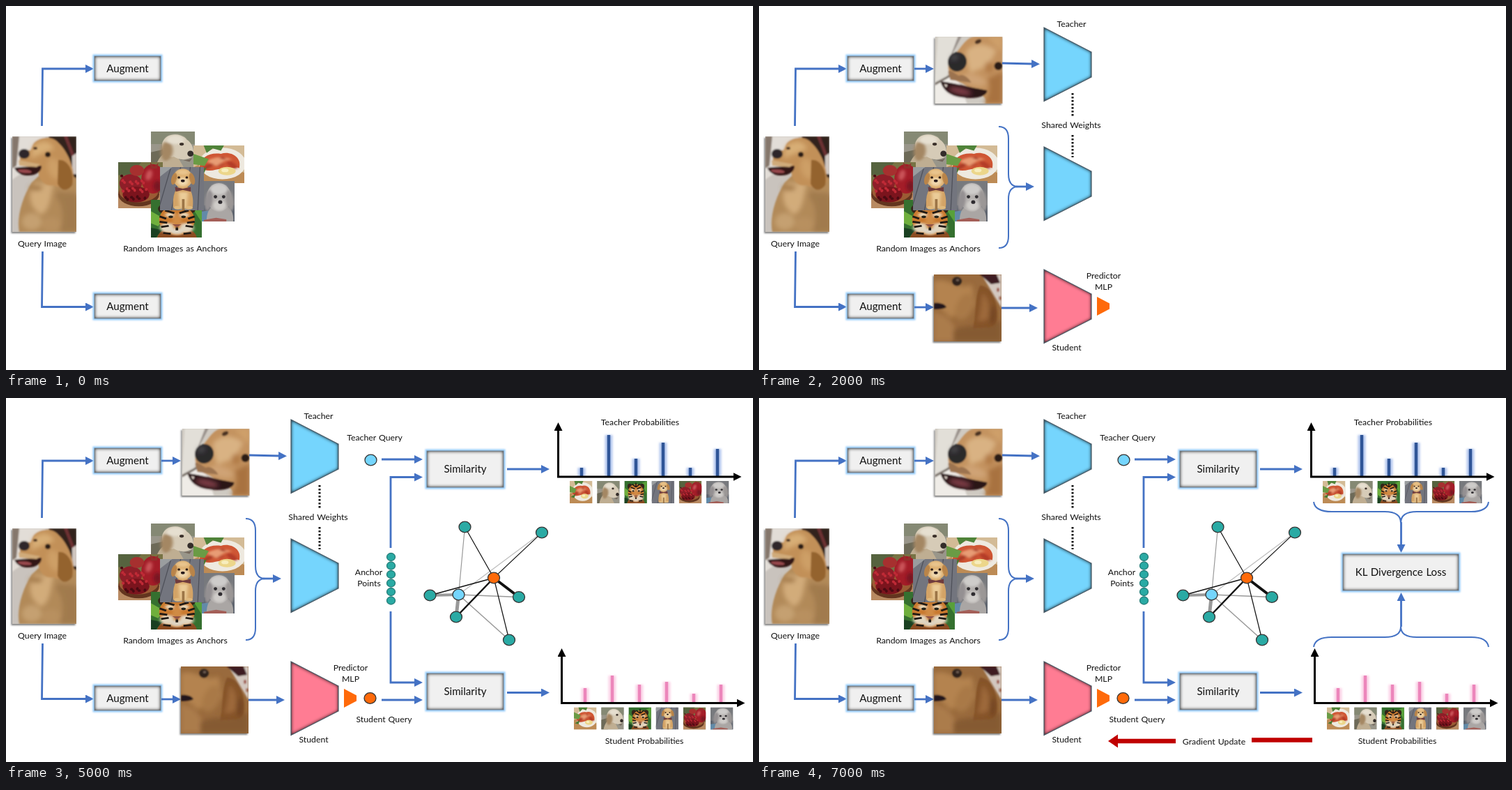
These frames come from a looping animation (1072x522 px, 8000 ms). An HTML page:

```html
<!DOCTYPE html>
<html lang="en">
<head>
<meta charset="utf-8">
<title>Teacher and student similarity</title>
<style>
  html, body { margin: 0; width: 100%; height: 100%; overflow: hidden; background: #fff; }
  svg { display: block; }
  text { font-family: Lato, Carlito, sans-serif; font-size: 12.3px; text-anchor: middle; fill: #111; word-spacing: .8px; }
  text.big { font-size: 15.1px; }
  .arrow { fill: none; stroke: #4472c4; stroke-width: 2.8; marker-end: url(#blueHead); }
  .brace { fill: none; stroke: #4472c4; stroke-width: 2; }
  .axis { fill: none; stroke: #000; stroke-width: 3; marker-end: url(#blackHead); }
</style>
</head>
<body>
<svg id="stage" width="1072" height="522" viewBox="0 0 1072 522"></svg>
<script>
const BLUE = '#75d5fd', ORANGE = '#ff6a0a', TEAL = '#2aaaa4', PINK = '#ff7c93';

const path = (d, fill) => `<path d="${d}" fill="${fill}"/>`;
const blob = (x, y, rx, ry, fill, turn = 0) =>
  `<ellipse cx="${x}" cy="${y}" rx="${rx}" ry="${ry}" fill="${fill}" transform="rotate(${turn} ${x} ${y})"/>`;
const text = (x, y, s, cls = '') => `<text class="${cls}" x="${x}" y="${y + (cls ? 5.4 : 4.4)}">${s}</text>`;
const line = (cls, d) => `<path class="${cls}" d="${d}"/>`;
const arrow = d => line('arrow', d);
const stroke = (d, color, width, extra = '') =>
  `<path d="${d}" fill="none" stroke="${color}" stroke-width="${width}" ${extra}/>`;
const haze = shapes => `<g filter="url(#haze)">${shapes}</g>`;
const dot = (x, y, fill, rx = 8.5, ry = 7.8, edge = '#333') =>
  `<ellipse cx="${x}" cy="${y}" rx="${rx}" ry="${ry}" fill="${fill}" stroke="${edge}" stroke-width="1.3"/>`;
const photo = (name, x, y, w, h) =>
  `<use href="#${name}" x="${x}" y="${y}" width="${w}" height="${h}"/>`;
const framed = (name, x, y, w, h) => `<g filter="url(#drop)">${photo(name, x, y, w, h)}</g>`;

function box(x, y, w, h, label) {
  const size = `x="${x}" y="${y}" width="${w}" height="${h}"`;
  return `<rect ${size} fill="none" stroke="#93cbfb" stroke-width="5" filter="url(#soft)"/>
    <rect ${size} fill="#f0f0f0" filter="url(#inner)"/>
    <rect ${size} fill="none" stroke="#76818c" stroke-width="1"/>` +
    text(x + w / 2, y + h / 2, label, 'big');
}

function encoder(y, fill) {
  const d = `M409 ${y}l68 35v36l-68 34.5z`;
  return `<path d="${d}" fill="${fill}" filter="url(#inner)"/>` + stroke(d, '#4a5a66', 1.2);
}

function chart(x, base, top, color, glow, tops, thumbX, thumbY) {
  const order = ['lobster', 'retriever', 'tiger', 'puppy', 'fruit', 'whiteDog'];
  const bars = tops.map((t, i) => {
    const d = `M${x + 33.5 + i * 39} ${base - 1}V${t}`;
    return stroke(d, glow, 11, 'filter="url(#glow)"') + stroke(d, color, 4.5);
  });
  return bars.join('') +
    line('axis', `M${x} ${base}V${top + 10}`) + line('axis', `M${x - 1.5} ${base}H${x + 252}`) +
    order.map((name, i) => photo(name, thumbX + i * 39.2, thumbY, 32.5, 32)).join('');
}

// Simplified pictures: width, height, ground colour, shapes.
const pictures = {
  query: [92, 137, '#c9c3bd',
    path('M0 0H48L20 48L0 62z', '#e2ddd7') + path('M0 0H10L6 42L0 46z', '#85776c') +
    path('M52 0H92V64L72 38z', '#33201f') + path('M74 0h5l10 26v12z', '#6d3033') +
    path('M86 28l6-4v30h-6z', '#cfc6c0') +
    path('M28 66C14 88 6 116 10 137H92V60L56 40z', '#b28a59') +
    haze(path('M32 66C20 84 26 104 42 112C56 104 54 84 60 68z', '#d2ac7a') +
      path('M66 78C80 86 96 70 96 100V137H68C76 116 72 96 62 86z', '#a17a4d') +
      blob(28, 122, 14, 12, '#c5a071') + blob(56, 126, 14, 10, '#b8905f') + blob(34, 74, 10, 4, '#a3794a')) +
    path('M30 11C38 0 58-1 66 9C80 22 90 46 88 66C78 74 66 74 58 70C46 72 36 60 38 50L12 37C8 26 14 18 26 20z', '#c29058') +
    haze(path('M30 14C42 4 56 6 60 18L44 24L26 32z', '#d8ae76') + blob(60, 46, 9, 15, '#cd9f66', -15)) +
    path('M66 34C80 32 90 52 86 70C78 80 70 78 65 68z', '#94632f') +
    path('M3 45C15 43 26 44 42 42C43 50 34 57 20 56C10 55 5 50 3 45z', '#331817') +
    blob(18, 50, 10, 2.4, '#9a4a4e', 6) + path('M9 34L40 40L35 44L10 42z', '#d0ab7a') +
    blob(17, 25, 8, 7, '#2e282a') + blob(51, 26, 4, 3.8, '#2b1b15') + blob(33, 17, 3, 2, '#4a3020')],
  cropFace: [97, 96, '#cfcac2',
    path('M4 0H34L16 60L0 66z', '#e2dfd8') + path('M33 0h5L20 34z', '#98908a') +
    path('M0 66L30 54L46 96H0z', '#efece7') + path('M0 66L22 54L23 57L0 70z', '#7b736c') +
    path('M30 24C40 12 46 0 58 0H97V96H72C78 86 60 80 38 66C18 62 16 42 22 32z', '#c3925f') +
    haze(path('M44 22C56 6 76 10 88 20L76 42L50 52z', '#d9b283') + path('M76 60L97 50V96H70C78 84 80 74 76 60z', '#a8723f') +
      path('M74 0H97V22z', '#cfa06a') + blob(56, 62, 18, 8, '#cfa374', 15) + blob(78, 44, 7, 8, '#b27d49')) +
    path('M8 64C28 66 46 72 75 77C75 86 58 90 38 87C22 85 11 77 8 64z', '#2a1517') +
    haze(blob(36, 78, 17, 4.5, '#84404a', 12)) + path('M13 68l3 5l2-4z', '#e8ddd2') +
    path('M19 50C21 46 28 52 34 56C40 52 50 60 52 66L22 62z', '#9c7350') +
    blob(32, 36, 13.5, 14, '#2b292c', 20) + haze(blob(28, 30, 5, 3, '#59565b', -25)) +
    blob(62, 7, 5, 3, '#4b3322', -25) + blob(91, 42, 6, 6, '#2b1b15')],
  cropEar: [97, 96, '#996a3c',
    path('M68 0H97V48L84 26z', '#d3c8c0') + path('M66 0H90L95 12L82 14z', '#3d1e20') +
    blob(92, 22, 2, 3, '#9f5b50') + blob(95, 34, 2, 3, '#a5705d') +
    haze(path('M0 10C18 2 36 24 54 14L60 44L24 62L0 40z', '#b4834f') + path('M0 54C20 58 34 72 32 96H0z', '#ab7b4b') +
      path('M28 80C46 70 60 78 97 66V96H28z', '#855a33') + blob(44, 46, 12, 20, '#a97946', 25)) +
    path('M66 16C84 16 94 44 90 68C84 80 66 74 56 78C61 56 58 34 66 16z', '#855329') +
    haze(path('M70 26C80 36 82 50 78 64C70 68 66 66 62 68C67 54 67 40 70 26z', '#9d693a') + blob(84, 58, 4, 14, '#714420')) +
    path('M0 41C8 40 16 42 18 47C12 51 5 49 0 50z', '#20151a') +
    blob(33, 10, 7, 6.5, '#2e211e') + blob(34, 8, 2, 1.5, '#7c695c')],
  retriever: [100, 100, '#99968a',
    path('M0 0H100V34H0z', '#858974') + path('M0 56L30 48V100H0z', '#6d6a58') +
    path('M10 100C16 66 34 48 56 58L76 100z', '#bfae92') +
    path('M26 30C34 2 68 2 82 22C96 32 100 56 94 68C80 80 62 76 52 68C40 74 22 56 26 30z', '#d6cbb7') +
    haze(blob(56, 22, 20, 12, '#e6dfd0') + path('M32 28C20 38 18 70 32 80C50 76 54 50 46 34z', '#a48764')) +
    blob(90, 60, 7, 8, '#342d2a') + blob(70, 34, 5, 4, '#3b302a') + path('M62 74Q78 82 94 72L88 82z', '#75685d')],
  lobster: [100, 100, '#d3bb96',
    path('M0 58L28 40L100 72V100H0z', '#bd8b55') + blob(57, 48, 46, 42, '#eee9df') +
    path('M12 58C14 30 32 18 54 22C74 14 96 32 90 60C80 54 72 68 58 62C44 60 32 76 12 58z', '#cf5634') +
    haze(path('M26 42Q46 24 76 36Q56 40 46 56z', '#e89c74') + blob(76, 52, 13, 6, '#b23a27', 45) +
      blob(28, 56, 13, 5, '#a93b27', -35) + blob(58, 34, 6, 3, '#a83a28', 25) + blob(54, 52, 8, 3, '#b8472f', -20)) +
    blob(66, 68, 17, 11, '#ecd68a') + blob(62, 66, 7, 5, '#f7edbd') +
    path('M20 0H60L54 14L38 8L26 20z', '#4f8339') + path('M0 22L30 36L22 54L0 50z', '#6a9b45') +
    path('M4 72L26 58L20 76z', '#477a30')],
  fruit: [100, 100, '#777344',
    path('M0 0H52L28 28H0z', '#56633f') + path('M0 66H100V100H0z', '#b88a62') +
    blob(46, 70, 46, 26, '#63351f') + blob(46, 63, 44, 24, '#9b5b34') +
    blob(78, 36, 26, 32, '#a31d28') + haze(blob(69, 28, 7, 12, '#cb555a', 20) + blob(88, 52, 9, 12, '#791620')) +
    path('M72 0L80 10L90 2L87 14H73z', '#93302c') +
    blob(28, 46, 25, 20, '#8e1e28') + blob(40, 70, 30, 17, '#7b141d') + blob(42, 18, 16, 12, '#a6302f') +
    [...Array(24)].map((_, i) => blob(8 + i * 23 % 56, 30 + i * 17 % 52, 3.5, 3, i % 3 ? '#bf2a36' : '#4a0b12', i * 40)).join('')],
  puppy: [100, 100, '#73757e',
    [0, 1, 2, 3, 4].map(i => stroke(`M${i * 30 - 34} 100L${i * 22 + 3} 0`, '#4e5059', 2)).join('') +
    path('M0 0H28L0 22z', '#9a9d9f') + path('M30 94C28 64 36 42 52 42C72 42 78 72 74 96z', '#d3a366') +
    haze(path('M42 58H64L60 98H46z', '#ebcc98')) + path('M50 74h6v26h-6z', '#9c7547') +
    blob(52, 26, 22, 22, '#dcae6f') + blob(32, 27, 6, 14, '#b98449', 14) + blob(73, 27, 6, 14, '#b98449', -14) +
    haze(blob(52, 34, 13, 10, '#efd7ad') + blob(52, 12, 14, 6, '#e9c58d')) +
    blob(43, 24, 3, 2.6, '#2b1c16') + blob(61, 24, 3, 2.6, '#2b1c16') + blob(52, 32, 4.5, 3.2, '#26191a') +
    path('M34 46L52 50L70 46V57L52 53L36 57z', '#6f3b3d') + blob(40, 94, 8, 4, '#dfb97d') + blob(66, 94, 8, 4, '#dfb97d')],
  whiteDog: [100, 100, '#77797d',
    path('M0 60H100V100H0z', '#5f656f') + path('M0 76L32 72V100H0z', '#628aa8') +
    path('M18 100C18 68 34 58 58 58C86 58 98 76 96 100z', '#aaa6a4') +
    blob(54, 40, 36, 35, '#b5b1af') +
    haze(blob(24, 48, 11, 26, '#949092', 10) + blob(86, 48, 11, 26, '#9b9796', -10) +
      blob(54, 20, 24, 13, '#ceccca') + blob(56, 60, 18, 13, '#cfccc9')) +
    blob(44, 39, 5, 4, '#2f2d30') + blob(68, 39, 5, 4, '#2f2d30') + blob(58, 52, 6, 4.5, '#2e2b2f') +
    path('M10 96L46 91L76 95V100H10z', '#a45f58')],
  tiger: [100, 100, '#35702f',
    path('M0 30L26 50L14 70L0 62z', '#6faf3d') + path('M76 10L100 0V60z', '#58a03a') + path('M0 74L22 80L10 100H0z', '#1a4021') +
    path('M12 100C16 82 30 72 50 72C74 72 88 84 90 100z', '#8b4c22') +
    blob(24, 24, 10, 12, '#33241a') + blob(78, 24, 10, 12, '#33241a') + blob(51, 54, 35, 40, '#c9792e') +
    haze(blob(32, 74, 14, 13, '#e2d6c0') + blob(70, 74, 14, 13, '#e2d6c0') + blob(38, 40, 10, 6, '#e8dabf') +
      blob(65, 40, 10, 6, '#e8dabf') + blob(51, 84, 14, 8, '#ded4c3') + path('M44 36H58L61 66H41z', '#d08b45')) +
    path('M42 65H60L51 73z', '#925547') + blob(39, 45, 4.5, 3.5, '#25231a') + blob(64, 45, 4.5, 3.5, '#25231a') +
    stroke('M34 14l15 12M68 14l-15 12M28 28l18 7M74 28l-18 7M51 8v20M17 44l13 6M86 44l-13 6M17 58l15 3M86 58l-15 3M20 72l15-3M83 72l-15-3M24 88l15 2M79 88l-15 2M51 73v8', '#201a15', 5)]
};

const symbols = Object.entries(pictures).map(([name, [w, h, ground, art]]) =>
  `<symbol id="${name}" viewBox="0 0 ${w} ${h}" preserveAspectRatio="none">
    <rect width="${w}" height="${h}" fill="${ground}"/><g filter="url(#photo)">${art}</g></symbol>`).join('');

const head = (id, color) =>
  `<marker id="${id}" markerUnits="userSpaceOnUse" markerWidth="12" markerHeight="12" refX="1" refY="6" orient="auto">
    <path d="M0 0L12 6L0 12z" fill="${color}"/></marker>`;
const blur = (id, amount) =>
  `<filter id="${id}" x="-2" y="-2" width="5" height="5"><feGaussianBlur stdDeviation="${amount}"/></filter>`;

const defs = `<defs>${head('blueHead', '#4472c4')}${head('blackHead', '#000')}
  ${blur('soft', 1)}${blur('photo', .9)}${blur('haze', 3)}
  <filter id="glow" filterUnits="userSpaceOnUse" x="780" y="20" width="292" height="450"><feGaussianBlur stdDeviation="1.5"/></filter>
  <filter id="drop"><feDropShadow dx="-1.5" dy="2" stdDeviation="1.2" flood-color="#555" flood-opacity=".75"/></filter>
  <filter id="inner" color-interpolation-filters="sRGB">
    <feGaussianBlur in="SourceAlpha" stdDeviation="2.6" result="b"/>
    <feComposite in="SourceAlpha" in2="b" operator="out" result="edge"/>
    <feMerge><feMergeNode in="SourceGraphic"/><feMergeNode in="edge"/></feMerge>
  </filter>${symbols}</defs>`;

const teacherNode = [649.5, 282], studentNode = [700, 258];
const anchors = [[658.5, 185], [769, 193], [608.5, 283], [736, 285.5], [646, 314], [722, 347]];
const links = (from, color, widths) =>
  anchors.map((a, i) => stroke(`M${from}L${a}`, color[i] || color[0], widths[i])).join('');

// Each entry appears one second after the previous one and stays.
const stages = [
  framed('query', 9, 187, 92, 137) + text(52, 341, 'Query Image') +
  arrow('M51.5 172L52.5 90H115') + arrow('M52.5 352L51.5 431.5H115') +
  box(127, 72, 95, 35, 'Augment') + box(127, 413, 95, 35, 'Augment') +
  photo('retriever', 208, 180, 63, 53) + photo('lobster', 269, 200, 73, 54) + photo('whiteDog', 279, 251, 49, 58) +
  photo('fruit', 161, 224, 64, 66) + photo('tiger', 208, 278, 73, 54) + photo('puppy', 221, 231, 63, 62) +
  text(243, 347.5, 'Random Images as Anchors'),

  arrow('M223 90H240') + arrow('M223 432H240') +
  framed('cropFace', 252.5, 44, 97, 96) + framed('cropEar', 251, 385, 97, 96),

  arrow('M349 82L392 83') + arrow('M348 433H389') +
  line('brace', 'M344 173Q358 173 358 190V241Q358 259 372 259Q358 259 358 277V330Q358 347 344 347') + arrow('M369 259H384') +
  encoder(31, BLUE) + encoder(202, BLUE) + encoder(378, PINK) +
  path('M485 417L503 426.5V434.5L485 444z', ORANGE) +
  stroke('M450 125V158M450 185V217', '#111', 3, 'stroke-dasharray="2.5 2.5"') +
  text(448.5, 26, 'Teacher') + text(448, 171, 'Shared Weights') + text(441.5, 490, 'Student') +
  text(494.5, 387, 'Predictor') + text(494.5, 402.5, 'MLP'),

  text(529, 56.5, 'Teacher Query') + text(520.5, 249.5, 'Anchor') + text(521, 265.5, 'Points') + text(542.5, 461, 'Student Query') +
  dot(523.5, 89, BLUE) + dot(522.5, 430.5, ORANGE) +
  [0, 1, 2, 3, 4, 5].map(i => dot(552.5, 228 + i * 12.5, TEAL, 6, 5.5, '#267d79')).join(''),

  arrow('M539 88H587') + arrow('M552 215V113.5H587') + arrow('M552 306V408H587') + arrow('M539 433H587') +
  box(604, 76, 110, 52, 'Similarity') + box(604, 395, 110, 52, 'Similarity') +
  links(teacherNode, ['#999', '#bbb'], [1.2, 1.2, 4, 1.3, 5, 1.5]) +
  links(studentNode, ['#111'], [1.2, 1.2, 1.3, 4, 2.5, 1.2]) +
  anchors.map(a => dot(...a, TEAL)).join('') + dot(...teacherNode, BLUE) + dot(...studentNode, ORANGE),

  arrow('M719 102H769') + arrow('M719 422.5H769') +
  chart(792.5, 113, 36, '#2f5597', '#b4c7ee', [100, 53, 87, 64, 100, 73], 809, 119) +
  chart(797.5, 437.5, 360, '#ec86bb', '#fbd3e7', [416, 398, 411, 407, 424, 411], 815, 443.5) +
  text(910, 35, 'Teacher Probabilities') + text(916, 491.5, 'Student Probabilities'),

  line('brace', 'M796 149Q798 163 822 163H898Q921 163 921 179Q921 163 944 163H1022Q1045 163 1047 149') + arrow('M921.5 178V211') +
  line('brace', 'M796 357Q798 343 822 343H898Q921 343 921 328Q921 343 944 343H1022Q1045 343 1047 357') + arrow('M921.5 328V290') +
  box(838, 224, 166, 52, 'KL Divergence Loss'),

  stroke('M598 492H512M707 490.5H794', '#c00000', 6.5) + path('M501 492L515 482.5V501.5z', '#c00000') +
  text(653, 492.5, 'Gradient Update')
];

const stage = document.getElementById('stage');
stage.innerHTML = defs + stages.map(s => `<g class="stage">${s}</g>`).join('');
const groups = stage.querySelectorAll('.stage');

function draw() {
  const step = Math.floor(performance.now() % 8000 / 1000);
  groups.forEach((g, i) => g.style.display = i <= step ? '' : 'none');
  requestAnimationFrame(draw);
}
draw();
</script>
</body>
</html>
```
